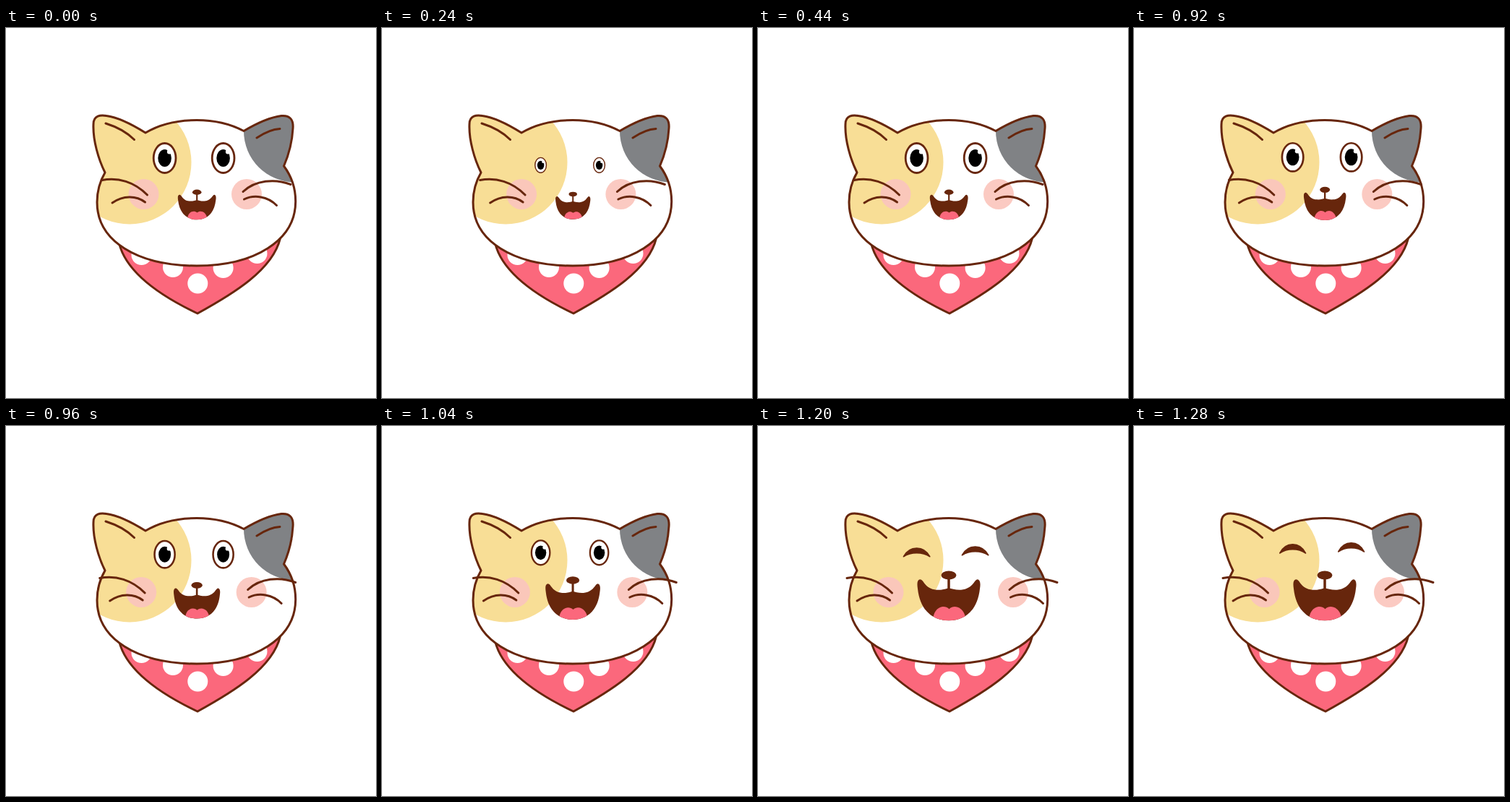
An HTML page that plays this animation: 512x512 px, repeating every 2080 ms.

```html
<!DOCTYPE html>
<html lang="en">
<head>
<meta charset="utf-8">
<title>Laughing cat</title>
<style>
  html, body { margin: 0; width: 100%; height: 100%; overflow: hidden; background: #fff; }
  svg { display: block; width: 100vw; height: 100vh; }
  .line { fill: none; stroke: #67260c; stroke-width: 3; stroke-linecap: round; stroke-linejoin: round; }
  .brown { fill: #67260c; }
  .pink { fill: #fb687c; }
  .cheek { fill: #fbc6bd; opacity: .92; }
</style>
</head>
<body>
<svg viewBox="0 0 512 512">
  <defs>
    <path id="headShape" d="M137 200C128 182 120 155 121 133C121 121 131 120 139 121.500C158 124 177 135 193 145C213 133 238 127.500 264 127.500C288 127.500 311 133 329 142.500C345 133 362 124 381 121.500C393 120.500 398 127 397 139C396 158 391 176 384.500 191C395 205 400.700 222 400.700 240C400.700 294 344 329 264 329C182 329 126 295 126 241C126 226 130 212 137 200Z"/>
    <path id="scarfShape" d="M156.500 298C166 336 208 368 265 395C314 368 369 335 379.500 291Z"/>
    <path id="mouthShape" d="M224 213C230 213 230 226 247 227.500C255 228 260 226 264 225C268 226 274 228 281 227.500C298 226 299 213 304 213C308 214 308 220 307 226C304 254 288 270 264 270C240 270 224 254 221 226C220 219 220 214 224 213Z"/>
    <clipPath id="inHead"><use href="#headShape"/></clipPath>
    <clipPath id="inScarf"><use href="#scarfShape"/></clipPath>
    <clipPath id="inMouth"><use href="#mouthShape"/></clipPath>
    <g id="openEye">
      <ellipse class="line" rx="15.400" ry="20.500" style="fill:#fff;stroke-width:2.800"/>
      <ellipse rx="9.300" ry="12"/>
      <circle cx="6.500" cy="-8.800" r="3.200" fill="#fff"/>
    </g>
    <path id="shutEye" class="line brown" style="fill:#67260c;stroke-width:1.500" d="M-18.500 5.500C-10 -9.500 10 -9.500 18.500 5.500C8 -1 -8 -1 -18.500 5.500Z"/>
  </defs>

  <use href="#scarfShape" class="pink"/>
  <g clip-path="url(#inScarf)" fill="#fff">
    <circle cx="187.500" cy="314" r="14"/>
    <circle cx="231" cy="331" r="14"/>
    <circle cx="265.300" cy="353.500" r="14"/>
    <circle cx="300.600" cy="332" r="14"/>
    <circle cx="347.500" cy="312" r="14"/>
  </g>
  <use href="#scarfShape" class="line"/>

  <use href="#headShape" fill="#fff"/>
  <g clip-path="url(#inHead)">
    <circle cx="171" cy="186" r="85.500" fill="#f8de96"/>
    <circle cx="400" cy="142.500" r="71" fill="#808285"/>
  </g>
  <use href="#headShape" class="line"/>
  <path class="line" d="M138 132C154 137 168 145 177.500 154.500M347 152C356 146 367 140 379 139.500"/>

  <g id="leftSide">
    <circle class="cheek" cx="190.500" cy="230" r="21"/>
    <path class="line" d="M133 210.500C155 206 178 213 195.500 231M147 242C162 231.500 180 231.500 192.500 241"/>
  </g>
  <g id="rightSide">
    <circle class="cheek" cx="333" cy="230" r="21"/>
    <path class="line" d="M328 226.500C345 210.500 372 208 394 216.500M329.500 237C343 230.500 362 232.500 374.500 245.500"/>
  </g>

  <g id="muzzle">
    <use href="#mouthShape" class="brown"/>
    <path class="pink" clip-path="url(#inMouth)" d="M242.500 266C244 252 257 247 264.500 254C272 247 285 252 287 266L280 274H250Z"/>
    <path class="line" style="stroke-width:3.500" d="M264 208V226"/>
    <ellipse class="brown" cx="264" cy="207.300" rx="10.400" ry="6"/>
  </g>

  <use id="openLeft" href="#openEye"/>
  <use id="openRight" href="#openEye"/>
  <use id="shutLeft" href="#shutEye"/>
  <use id="shutRight" href="#shutEye"/>
</svg>
<script>
const LOOP = 2080, TICK = 40;
const EYE_LEFT = 219.6, EYE_RIGHT = 300.6;
const part = id => document.getElementById(id);
const clamp01 = v => Math.min(1, Math.max(0, v));

function place(id, x, y, sx = 1, sy = sx) {
  part(id).setAttribute("transform", `translate(${x} ${y}) scale(${sx} ${sy})`);
}

function show(id, visible) {
  part(id).style.display = visible ? "" : "none";
}

// 0 at rest, 1 half closed, 2 held in the blink
function blinkLevel(t) {
  if (t < 240 || t >= 440) return 0;
  return t < 280 || t >= 400 ? 1 : 2;
}

function draw(time) {
  const t = Math.floor((time % LOOP) / TICK) * TICK;
  const blink = blinkLevel(t);
  const laugh = blink ? [0, -0.13, -0.2][blink] : clamp01((t - 880) / 240);

  place("leftSide", (laugh < 0 ? -20 : -10) * laugh, 0);
  place("rightSide", 20 * laugh, 0);

  const grow = (1 + 0.65 * laugh) / 1.65;
  place("muzzle", 264.5 * (1 - grow), 260 * (1 - grow) - 0.8, grow);

  const shut = t >= 1120;
  const eyeScale = blink ? [1, 0.51, 0.36][blink] : 1 - 0.26 * laugh;
  const eyeY = blink ? 200 - 20 * eyeScale : 180 - 7 * laugh;
  const lift = clamp01((t - 1120) / 160);
  for (const [side, x, dy] of [["Left", EYE_LEFT, 0], ["Right", EYE_RIGHT, -2]]) {
    show("open" + side, !shut);
    show("shut" + side, shut);
    place("open" + side, x, eyeY, eyeScale);
    place("shut" + side, x, 180 + dy - 10 * lift, 1 - 0.03 * lift, 1 + 0.08 * lift);
  }
}

const start = performance.now();
function frame() {
  draw(performance.now() - start);
  requestAnimationFrame(frame);
}
draw(0);
requestAnimationFrame(frame);
</script>
</body>
</html>
```
